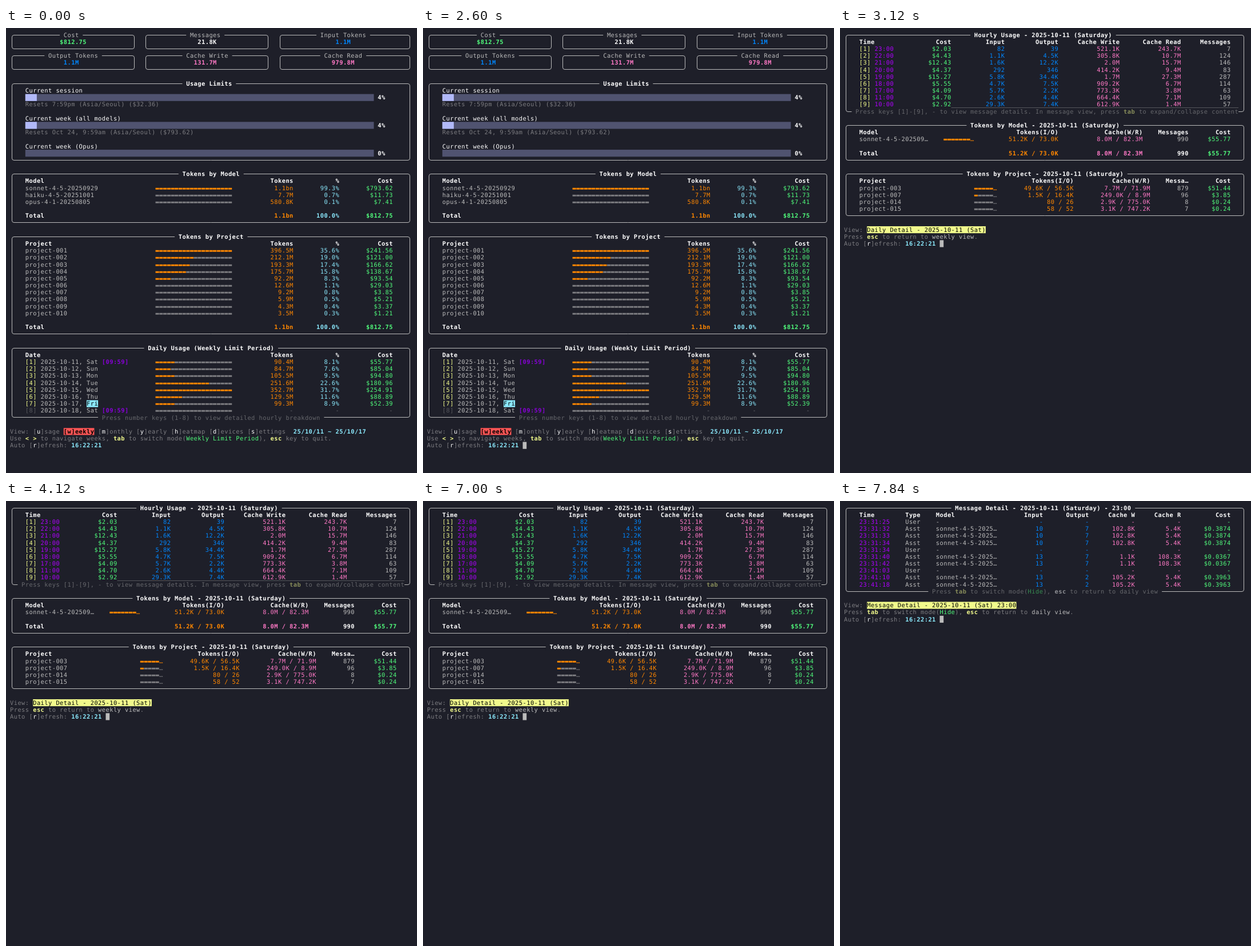
Animation, 719 px wide and 779 px high, one loop 8000 ms. Source, as an HTML page with a canvas:

```html
<!DOCTYPE html>
<html lang="en">
<head>
<meta charset="utf-8">
<title>Terminal usage dashboard</title>
<style>
  html, body { margin: 0; width: 100%; height: 100%; overflow: hidden; background: #1e1f29; }
  canvas { display: block; }
</style>
</head>
<body>
<canvas id="stage" width="719" height="779"></canvas>
<script>
const ctx = document.getElementById('stage').getContext('2d');
const LOOP = 8000;
const CELL_W = 6.7, CELL_H = 12.18, LEFT = 7, TOP = 6, FONT_SIZE = 10.4, ASCENT = 9.65;
const COLORS = {
  back: '#1e1f29', black: '#000000', white: '#ffffff', text: '#bbbbbb', gray: '#7c7c80', dim: '#66676c',
  faint: '#55565c', green: '#50fa7b', blue: '#0087ff', pink: '#ff79c6', orange: '#ff8700',
  cyan: '#8be9fd', yellow: '#f1fa8c', red: '#ff5555', purple: '#af00ff', violet: '#8700d7',
  dimYellow: '#888d5b', dimGreen: '#378d52', dimWhite: '#8e8f94', fill: '#b1b9f9', track: '#505370'
};
const UNITS = { K: 1e3, M: 1e6, bn: 1e9 };

const cellX = col => LEFT + col * CELL_W;
const cellY = row => TOP + row * CELL_H;

function block(col, row, width, color) {
  ctx.fillStyle = COLORS[color];
  ctx.fillRect(cellX(col), cellY(row), width * CELL_W, CELL_H);
}

// Style is "ink", "ink/background" or either followed by " bold". Returns the next column.
function put(col, row, text, style) {
  const [paint, weight = 'normal'] = style.split(' ');
  const [ink, background] = paint.split('/');
  if (background) block(col, row, text.length, background);
  ctx.font = `${weight} ${FONT_SIZE}px "DejaVu Sans Mono", monospace`;
  ctx.fillStyle = COLORS[ink];
  [...text].forEach((char, i) => {
    if (char !== ' ') ctx.fillText(char, cellX(col + i), cellY(row) + ASCENT);
  });
  return col + text.length;
}

function run(col, row, ...parts) {
  for (let i = 0; i < parts.length; i += 2) col = put(col, row, parts[i + 1], parts[i]);
}

function box(left, top, right, bottom, title, style = 'white bold') {
  const x = col => Math.floor(cellX(col + 0.45)) + 0.5;
  const y = row => Math.floor(cellY(row + 0.5)) + 0.5;
  ctx.strokeStyle = COLORS.text;
  ctx.lineWidth = 1;
  ctx.beginPath();
  ctx.roundRect(x(left), y(top), x(right) - x(left), y(bottom) - y(top), 3.5);
  ctx.stroke();
  const col = Math.floor((left + right + 1 - title.length) / 2);
  block(col - 1, top, title.length + 2, 'back');
  put(col, top, title, style);
}

function card(left, top, right, title, value, color) {
  box(left, top, right, top + 2, title, 'text');
  put(Math.floor((left + right + 1 - value.length) / 2), top + 1, value, color + ' bold');
}

// Columns are [position, color]; a negative position is a right edge.
function cells(row, columns, line, styleOf = color => color) {
  line.split('|').forEach((text, i) => {
    const [position, color] = columns[i];
    put(position < 0 ? -position - text.length : position, row, text, styleOf(color));
  });
}
const header = (row, columns, line) => cells(row, columns, line, () => 'white bold');
const total = (row, columns, line) =>
  cells(row, columns, line, color => (color === 'text' ? 'white' : color) + ' bold');
const table = (row, columns, lines) => lines.forEach((line, i) => cells(row + i, columns, line));

function bar(col, row, filled, length, tail = '') {
  const rest = length - filled;
  run(col, row, 'orange', '▬'.repeat(filled) + (rest ? '' : tail),
    'gray', '▬'.repeat(rest) + (rest ? tail : ''));
}

function barTable(row, columns, lines) {
  const amounts = lines.map(line => {
    const [, number, unit] = line.split('|')[1].match(/([\d.]+)(\w+)/) || [0, 0, 'K'];
    return number * UNITS[unit];
  });
  const most = Math.max(...amounts);
  table(row, columns, lines);
  amounts.forEach((amount, i) => bar(38, row + i, Math.floor(20 * amount / most), 20));
}

function limit(row, title, percent, note, width) {
  put(4, row, title, 'white');
  block(4, row + 1, 91, 'track');
  block(4, row + 1, width, 'fill');
  put(96, row + 1, percent, 'white bold');
  put(4, row + 2, note, 'gray');
}

const refresh = row =>
  run(0, row, 'gray', 'Auto [', 'white', 'r', 'gray', ']efresh: ', 'cyan bold', '16:22:21');

function weekly() {
  card(0, 0, 32, 'Cost', '$812.75', 'green');
  card(35, 0, 67, 'Messages', '21.8K', 'white');
  card(70, 0, 104, 'Input Tokens', '1.1M', 'blue');
  card(0, 3, 32, 'Output Tokens', '1.1M', 'blue');
  card(35, 3, 67, 'Cache Write', '131.7M', 'pink');
  card(70, 3, 104, 'Cache Read', '979.8M', 'pink');

  box(0, 7, 104, 18, 'Usage Limits');
  limit(8, 'Current session', '4%', 'Resets 7:59pm (Asia/Seoul) ($32.36)', 3);
  limit(12, 'Current week (all models)', '4%', 'Resets Oct 24, 9:59am (Asia/Seoul) ($793.62)', 3);
  limit(16, 'Current week (Opus)', '0%', '', 0);

  const columns = [[4, 'text'], [-74, 'orange'], [-86, 'cyan'], [-100, 'green']];
  const sum = 'Total|1.1bn|100.0%|$812.75';
  box(0, 20, 104, 27, 'Tokens by Model');
  header(21, columns, 'Model|Tokens|%|Cost');
  barTable(22, columns, [
    'sonnet-4-5-20250929|1.1bn|99.3%|$793.62',
    'haiku-4-5-20251001|7.7M|0.7%|$11.73',
    'opus-4-1-20250805|580.8K|0.1%|$7.41'
  ]);
  total(26, columns, sum);

  box(0, 29, 104, 43, 'Tokens by Project');
  header(30, columns, 'Project|Tokens|%|Cost');
  barTable(31, columns, [
    '396.5M|35.6%|$241.56', '212.1M|19.0%|$121.00', '193.3M|17.4%|$166.62', '175.7M|15.8%|$138.67',
    '92.2M|8.3%|$93.54', '12.6M|1.1%|$29.03', '9.2M|0.8%|$3.85', '5.9M|0.5%|$5.21',
    '4.3M|0.4%|$3.37', '3.5M|0.3%|$1.21'
  ].map((line, i) => `project-${String(i + 1).padStart(3, '0')}|${line}`));
  total(42, columns, sum);

  box(0, 45, 104, 55, 'Daily Usage (Weekly Limit Period)');
  header(46, columns, 'Date|Tokens|%|Cost');
  const days = [
    'Sat|90.4M|8.1%|$55.77', 'Sun|84.7M|7.6%|$85.04', 'Mon|105.5M|9.5%|$94.80',
    'Tue|251.6M|22.6%|$180.96', 'Wed|352.7M|31.7%|$254.91', 'Thu|129.5M|11.6%|$88.89',
    'Fri|99.3M|8.9%|$52.39'
  ].map((line, i) => `    2025-10-${11 + i}, ${line}`);
  barTable(47, columns, days);
  days.forEach((_, i) => put(4, 47 + i, `[${i + 1}]`, 'yellow'));
  put(20, 53, 'Fri', 'black/cyan');
  run(4, 54, 'faint', '[8] ', 'text', '2025-10-18, Sat');
  bar(38, 54, 0, 20);
  for (const col of [73, 85, 99]) put(col, 54, '-', 'dim');
  for (const row of [47, 54]) put(24, row, '[09:59]', 'violet bold');
  block(23, 55, 59, 'back');
  put(24, 55, 'Press number keys (1-8) to view detailed hourly breakdown', 'dim');

  let col = put(0, 57, 'View: ', 'gray');
  for (const view of ['usage', 'weekly', 'monthly', 'yearly', 'heatmap', 'devices', 'settings']) {
    const key = view[0], rest = `]${view.slice(1)}`;
    if (view === 'weekly') put(col, 57, `[${key}${rest}`, 'black/red bold');
    else run(col, 57, 'gray', '[', 'white', key, 'gray', rest);
    col += view.length + 3;
  }
  put(col + 1, 57, '25/10/11 ~ 25/10/17', 'cyan bold');
  run(0, 58, 'gray', 'Use ', 'yellow bold', '< >', 'gray', ' to navigate weeks, ', 'yellow bold', 'tab',
    'gray', ' to switch mode(', 'green', 'Weekly Limit Period', 'gray', '), ', 'yellow bold', 'esc',
    'gray', ' key to quit.');
  refresh(59);
}

function daily() {
  const day = '2025-10-11 (Saturday)';
  const hours = [[4, 'yellow'], [8, 'purple'], [-28, 'green'], [-42, 'blue'], [-56, 'blue'],
    [-72, 'pink'], [-88, 'pink'], [-101, 'text']];
  box(0, 0, 104, 11, `Hourly Usage - ${day}`);
  header(1, hours, 'Time||Cost|Input|Output|Cache Write|Cache Read|Messages');
  table(2, hours, [
    '23:00|$2.03|82|39|521.1K|243.7K|7',
    '22:00|$4.43|1.1K|4.5K|305.8K|10.7M|124',
    '21:00|$12.43|1.6K|12.2K|2.0M|15.7M|146',
    '20:00|$4.37|292|346|414.2K|9.4M|83',
    '19:00|$15.27|5.8K|34.4K|1.7M|27.3M|287',
    '18:00|$5.55|4.7K|7.5K|909.2K|6.7M|114',
    '17:00|$4.09|5.7K|2.2K|773.3K|3.8M|63',
    '11:00|$4.70|2.6K|4.4K|664.4K|7.1M|109',
    '10:00|$2.92|29.3K|7.4K|612.9K|1.4M|57'
  ].map((line, i) => `[${i + 1}]|${line}`));
  block(2, 11, 101, 'back');
  run(3, 11, 'dim', 'Press keys [1]-[9], - to view message details. In message view, press ',
    'dimYellow bold', 'tab', 'dim', ' to expand/collapse content');
  ctx.fillStyle = COLORS.faint;
  ctx.fillRect(cellX(28), Math.floor(cellY(11)), 75 * CELL_W, 1);

  const models = [[4, 'text'], [-56, 'orange'], [-78, 'pink'], [-90, 'text'], [-101, 'green']];
  box(0, 13, 104, 18, `Tokens by Model - ${day}`);
  header(14, models, 'Model|Tokens(I/O)|Cache(W/R)|Messages|Cost');
  cells(15, models, 'sonnet-4-5-202509…|51.2K / 73.0K|8.0M / 82.3M|990|$55.77');
  bar(26, 15, 7, 7, '…');
  total(17, models, 'Total|51.2K / 73.0K|8.0M / 82.3M|990|$55.77');

  const projects = [[4, 'text'], [-60, 'orange'], [-80, 'pink'], [-90, 'text'], [-101, 'green']];
  box(0, 20, 104, 26, `Tokens by Project - ${day}`);
  header(21, projects, 'Project|Tokens(I/O)|Cache(W/R)|Messa…|Cost');
  table(22, projects, [
    'project-003|49.6K / 56.5K|7.7M / 71.9M|879|$51.44',
    'project-007|1.5K / 16.4K|249.0K / 8.9M|96|$3.85',
    'project-014|80 / 26|2.9K / 775.0K|8|$0.24',
    'project-015|58 / 52|3.1K / 747.2K|7|$0.24'
  ]);
  [5, 1, 0, 0].forEach((filled, i) => bar(34, 22 + i, filled, 5, '…'));

  run(0, 28, 'gray', 'View: ', 'black/yellow', 'Daily Detail - 2025-10-11 (Sat)');
  run(0, 29, 'gray', 'Press ', 'yellow bold', 'esc', 'gray', ' to return to ', 'text', 'weekly view', 'gray', '.');
  refresh(30);
}

function messages() {
  const columns = [[4, 'purple'], [16, 'text'], [24, 'text'], [-52, 'blue'], [-64, 'blue'],
    [-76, 'pink'], [-88, 'pink'], [-101, 'green']];
  box(0, 0, 104, 12, 'Message Detail - 2025-10-11 (Saturday) - 23:00');
  header(1, columns, 'Time|Type|Model|Input|Output|Cache W|Cache R|Cost');
  const first = '10|7|102.8K|5.4K|$0.3874', second = '13|7|1.1K|108.3K|$0.0367',
    third = '13|2|105.2K|5.4K|$0.3963';
  table(2, columns, [
    ['31:25'], ['31:32', first], ['31:33', first], ['31:34', first], ['31:34'],
    ['31:40', second], ['31:42', second], ['41:03'], ['41:10', third], ['41:18', third]
  ].map(([time, usage]) =>
    `23:${time}|` + (usage ? `Asst|sonnet-4-5-2025…|${usage}` : 'User|-|-|-|-|-|-')));
  block(22, 12, 61, 'back');
  run(23, 12, 'dim', 'Press ', 'dimYellow bold', 'tab', 'dim', ' to switch mode(', 'dimGreen', 'Hide',
    'dim', '), ', 'dimWhite bold', 'esc', 'dim', ' to return to daily view');

  run(0, 14, 'gray', 'View: ', 'black/yellow', 'Message Detail - 2025-10-11 (Sat) 23:00');
  run(0, 15, 'gray', 'Press ', 'yellow bold', 'tab', 'gray', ' to switch mode(', 'green', 'Hide',
    'gray', '), ', 'yellow bold', 'esc', 'gray', ' to return to ', 'text', 'daily view', 'gray', '.');
  refresh(16);
}

const blank = () => {};

// The cursor starts visible in each scene and flips at every listed time.
const SCENES = [
  { start: 0, draw: weekly, cursor: [25, 59], flips: [0, 80, 520, 880, 1320, 1760, 2160, 2600] },
  { start: 3040, draw: blank, cursor: [0, 0], flips: [] },
  { start: 3120, draw: daily, cursor: [25, 30], flips: [3600, 4120, 4600, 5080, 5560, 6040, 6560, 7000] },
  { start: 7040, draw: blank, cursor: [25, 30], flips: [] },
  { start: 7080, draw: blank, cursor: [0, 0], flips: [7640] },
  { start: 7840, draw: messages, cursor: [25, 16], flips: [] }
];

let shown = '';
function frame() {
  const time = performance.now() % LOOP;
  const scene = SCENES.findLast(({ start }) => start <= time);
  const cursorOn = scene.flips.filter(flip => flip <= time).length % 2 === 0;
  const state = `${scene.start} ${cursorOn}`;
  if (state !== shown) {
    shown = state;
    ctx.textRendering = 'geometricPrecision';
    ctx.fillStyle = COLORS.back;
    ctx.fillRect(0, 0, 719, 779);
    scene.draw();
    if (cursorOn) block(...scene.cursor, 1, 'text');
  }
  requestAnimationFrame(frame);
}
frame();
</script>
</body>
</html>
```
